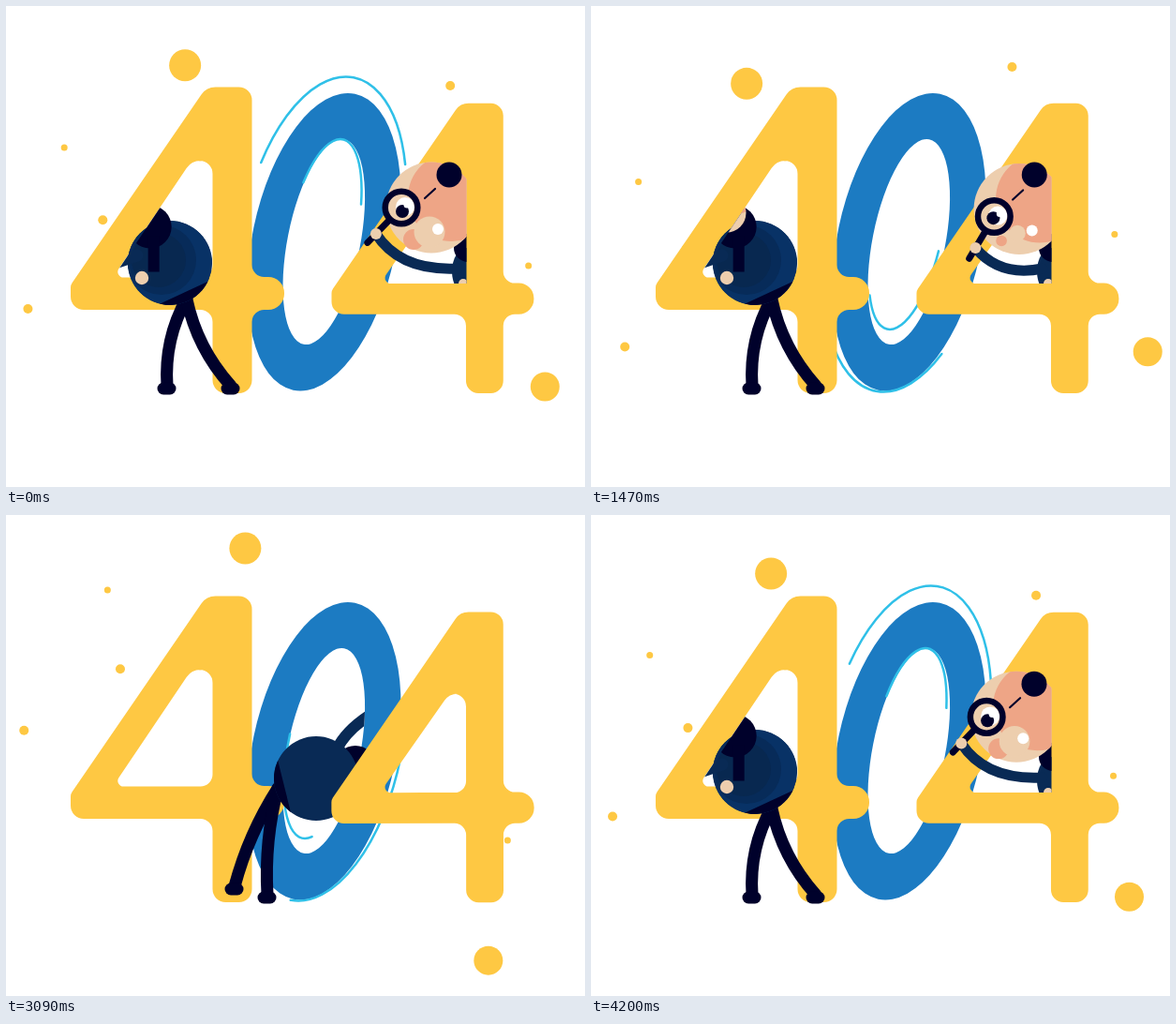
Write an HTML page with a canvas that moves like this. It is 618 by 513 pixels and loops after 4.23 s.

```html
<!DOCTYPE html>
<html lang="en">
<head>
<meta charset="utf-8">
<title>404</title>
<style>
html, body { margin: 0; width: 100%; height: 100%; overflow: hidden; background: #fff; }
canvas { display: block; }
</style>
</head>
<body>
<canvas id="stage" width="618" height="513"></canvas>
<script>
const g = document.getElementById('stage').getContext('2d');
// Time runs from the intro at START, through 0, to the hard cut at CUT
const LOOP = 4230, CUT = 2160, START = CUT - LOOP;
const TAU = Math.PI * 2, DEG = Math.PI / 180;
const YELLOW = '#fec843', BLUE = '#1c7bc2', CYAN = '#2fc0e8', INK = '#00012b';
const SUIT = '#092a55', SLEEVE = '#083266', SKIN = '#edceae', PINK = '#eea586', WHITE = '#fff';

const clamp = v => Math.max(0, Math.min(1, v));
const smooth = p => p * p * (3 - 2 * p);
const ramp = (u, from, length) => clamp((u - from) / length);
const grow = (u, from, tau) => u > from ? 1 - Math.exp((from - u) / tau) : 0;
const polar = (x, y, r, deg) => [x + r * Math.cos(deg * DEG), y + r * Math.sin(deg * DEG)];

// Blend between key poses [time, ...values]
function pose(u, keys) {
  let i = 0;
  while (i < keys.length - 2 && u >= keys[i + 1][0]) i++;
  const a = keys[i], b = keys[i + 1];
  const p = smooth(ramp(u, a[0], b[0] - a[0]));
  return a.slice(1).map((v, k) => v + (b[k + 1] - v) * p);
}

function disc(x, y, r, color) {
  g.fillStyle = color;
  g.beginPath();
  g.arc(x, y, Math.max(0, r), 0, TAU);
  g.fill();
}

function clipDisc(x, y, r, color) {
  disc(x, y, r, color);
  g.clip();
}

// Two points: line, three: quadratic, four: cubic
function stroke(pts, width, color) {
  g.strokeStyle = color;
  g.lineWidth = width;
  g.lineCap = 'round';
  g.beginPath();
  g.moveTo(pts[0], pts[1]);
  const rest = pts.slice(2);
  if (rest.length === 2) g.lineTo(...rest);
  else if (rest.length === 4) g.quadraticCurveTo(...rest);
  else g.bezierCurveTo(...rest);
  g.stroke();
}

function roundPoly(path, pts) {
  const last = pts[pts.length - 1];
  path.moveTo((last[0] + pts[0][0]) / 2, (last[1] + pts[0][1]) / 2);
  pts.forEach(([x, y, r], i) => {
    const next = pts[(i + 1) % pts.length];
    path.arcTo(x, y, next[0], next[1], r);
  });
  path.closePath();
}

// Digit 4 at a scale, placed by its lower left corner, with its own hole
function makeFour(x, s, hole) {
  const path = new Path2D();
  const outline = [
    [145, -326.5, 18], [193.5, -326.5, 14], [193.5, -124, 13], [228, -124, 17], [228, -89, 17],
    [193.5, -89, 13], [193.5, 0, 14], [151.5, 0, 14], [151.5, -89, 13], [0, -89, 14], [0, -115.5, 9]
  ];
  roundPoly(path, outline.map(([px, py, r]) => [x + px * s, 413 + py * s, r * s]));
  const [left, apex, top] = hole, right = x + 151.5 * s, base = 413 - 123.5 * s;
  roundPoly(path, [[left, base, 6], [apex, top, 18 * s], [right, top, 14 * s], [right, base, 13 * s]]);
  return path;
}
const leftFour = makeFour(69, 1, [114, 198, 165]);
const rightFour = makeFour(347.5, 0.947, [399, 473, 191]);

const zero = new Path2D(), hole = new Path2D();
hole.ellipse(339.3, 251.5, 38.8, 111.4, 11.2 * DEG, 0, TAU);
zero.ellipse(339.5, 251.7, 76.7, 161.4, 11.8 * DEG, 0, TAU);
zero.closePath();
zero.addPath(hole);

function fillPath(path, color) {
  g.fillStyle = color;
  g.fill(path, 'evenodd');
}

// Pops a digit in with overshoot, turning around its centre
function popIn(u, start, cx, cy, turn, draw) {
  const q = 1 - ramp(u, start, 645);
  if (q === 1) return;
  const s = 1 + 2 * q * q - 3 * q * q * q;
  g.save();
  g.translate(cx, cy);
  g.rotate(-turn * Math.pow(q, 1.5) * DEG);
  g.scale(s, s);
  g.translate(-cx, -cy);
  draw();
  g.restore();
}

// angle, orbit radius, size, launch time
const DOTS = [
  [166.5, 304, 5, -1902], [186.3, 217, 5, -2011], [201.5, 276, 3.5, -1856], [-124.1, 228, 17, -1921],
  [-47.1, 228, 5, -1994], [6, 240, 3.5, -1850], [31, 299, 15.5, -1980]
];

function drawDots(u) {
  const spin = 56 * (Math.pow(1 - (u - START) / 6970, 5) - 0.1717);
  for (const [angle, orbit, size, start] of DOTS) {
    const k = grow(u, start, 170);
    disc(...polar(319, 252, orbit * k, angle + spin), size * Math.min(1, k * 1.4), YELLOW);
  }
}

function sweep(from, to, x, y, rx, ry, tilt) {
  if (to <= from) return;
  g.strokeStyle = CYAN;
  g.lineWidth = 2.5;
  g.lineCap = 'round';
  g.beginPath();
  g.ellipse(x, y, rx, ry, tilt * DEG, from * DEG, to * DEG);
  g.stroke();
}

function drawZero(u) {
  fillPath(zero, BLUE);
  const tail = 328 - 0.107 * u;
  sweep(tail - 127 * grow(u, -1450, 250), tail, 337.5, 243.5, 85, 170.6, 11.5);
  const lead = 340 + 0.106 * u - 38 * Math.exp(-(u + 1140) / 437);
  sweep(lead - 130 * grow(u, -1830, 400), lead, 338, 243.5, 36.2, 103.5, 12.1);
}

// body, spine angle, feet, lift of the first foot, knee bend, hand
const CLIMB = [
  [-1140, 331, 281, 166, 244, 279, 9, 9, 392, 211],
  [-450, 185, 284, 65, 238, 256, 0, 32, 215, 321],
  [-120, 175, 274, 65, 172, 240, 0, 14, 145, 290]
];
// face, relative to the head
const FACE = [[-450, -22, -4], [0, -29, 0], [990, -13, -2], [1980, -5, -29]];

function drawLeg(hx, hy, fx, fy, bend) {
  const dx = fx - hx, dy = fy - hy, k = bend / Math.hypot(dx, dy);
  stroke([hx, hy, (hx + fx) / 2 - dy * k, (hy + fy) / 2 + dx * k, fx, fy], 13, INK);
  stroke([fx - 4, fy + 3, fx + 3, fy + 3], 13, INK);
}

function drawTorso(x, y, spine, settled) {
  g.save();
  g.beginPath();
  clipDisc(x, y, 45, SUIT);
  g.globalAlpha = settled;
  disc(x, y, 45, SLEEVE);
  disc(x - 9, y - 3, 37, '#072b59');
  disc(x - 12, y - 3, 29, '#082850');
  g.globalAlpha = 1;
  g.translate(x, y);
  g.rotate(spine * DEG);
  g.fillStyle = INK;
  g.fillRect(35, -45, 20, 90);
  g.restore();
}

function drawClimber(u) {
  if (u < -1470) return;
  const [x, y, spine, foot1, foot2, lift, bend, handX, handY] = pose(u, CLIMB);
  const hip = polar(x, y, 42, spine), [hx, hy] = polar(x, y, 44, spine + 176);
  const emerging = u < -830, settled = ramp(u, -450, 330), bow = 43 * ramp(u, -1140, 690);
  const arm = [x + 8, y - 34, x + 8 + bow, y - 36, handX + bow, handY - 10, handX, handY];

  g.save();
  if (emerging) {
    g.beginPath();
    g.rect(0, 0, 395, 513);
    g.clip();
    g.translate(175 * Math.pow(1 - ramp(u, -1470, 330), 2), 0);
    g.save();
    g.clip(hole);
    stroke([x + 22, y - 31, x + 32, y - 52, handX, handY], 12, SUIT);
    g.restore();
    disc(hx, hy, 21.5, INK);
  }
  drawLeg(...hip, foot1, 405 - lift, bend);
  drawLeg(...hip, foot2, 405, bend);
  drawTorso(x, y, spine, settled);

  if (!emerging) {
    // the head stays behind the slanted bar
    g.save();
    g.beginPath();
    g.moveTo(114, 290);
    g.lineTo(198, 165);
    g.lineTo(618, 165);
    g.lineTo(618, 340);
    g.lineTo(114, 340);
    g.clip();
    stroke([x - 35, y - 8, x - 62, y + 1], 13, SUIT);
    disc(hx, hy, 23, INK);
    const [fx, fy] = pose(u, FACE);
    clipDisc(hx + fx, hy + fy, 27 - 6 * settled, SKIN);
    disc(hx + fx + 8, hy + fy - 23, 25, PINK);
    g.restore();
    g.fillStyle = INK;
    g.fillRect(hx - 2, hy + 10, 12, 38);
    g.globalAlpha = 1 - settled;
    stroke(arm, 13, SLEEVE);
    g.globalAlpha = 1;
    disc(handX, handY, 7.2, SKIN);
  }
  g.restore();
}

// head, and how far the lens is lowered
const PEEK = [[-450, 458, 231, 0.95], [0, 454, 215, 0], [990, 448, 227, 1], [1980, 467, 205, -0.1]];

function drawHead(x, y, dip, open) {
  g.save();
  clipDisc(x, y, 48.5, SKIN);
  disc(x + 22, y - 11, 47, PINK);
  g.restore();
  const ear = 11 * clamp(1 - dip);
  disc(x - 19, y + 34, ear, PINK);
  disc(x - 2, y + 26, ear * 1.5, SKIN);
  disc(x + 19 - 6 * dip, y - 35 - 3 * dip, 13.5, INK);

  g.globalAlpha = 1 - open;
  stroke([x - 7, y - 10, x + 4, y - 20], 2.2, INK);
  g.globalAlpha = open;
  disc(x, y - 18, 8, WHITE);
  disc(x - 7, y - 12, 7, INK);
  g.globalAlpha = 1;
  const mx = x + 7 + 14 * dip, my = y + 23 - 8 * open;
  stroke([mx - 2 * open, my + 8 * open, mx + 3 * open, my - 7 * open + 0.01], 12, WHITE);
}

function drawLens(x, y, dip, angle) {
  stroke([...polar(x, y, 19, angle), ...polar(x, y, 52, angle)], 7, INK);
  disc(x, y, 17, SKIN);
  disc(x + 4, y - 1, 10, WHITE);
  disc(x + 1 - 4 * dip, y + 4 - 5 * dip, 7, INK);
  disc(x + 6, y - 3, 3.5, WHITE);
  g.strokeStyle = INK;
  g.lineWidth = 6.5;
  g.beginPath();
  g.arc(x, y, 17.3, 0, TAU);
  g.stroke();
}

function drawPeeker(u) {
  if (u < -930) return;
  const [x, y, dip] = pose(u, PEEK);
  const lx = x - 32 + 11 * dip, ly = y + 17 * dip, angle = 134 - 28 * dip;
  const [hx, hy] = polar(lx, ly, 39, angle);
  g.save();
  g.beginPath();
  g.rect(0, 0, 491.5, 296);
  g.clip();
  g.translate(110 * Math.pow(1 - ramp(u, -930, 330), 3), 0);

  g.fillStyle = SUIT;
  g.beginPath();
  g.ellipse(492, 283, 16, 25, 0, 0, TAU);
  g.fill();
  disc(493, 258, 15, INK);
  stroke([hx, hy, hx + 26, hy * 0.42 + 181, 482, 280], 11, SUIT);
  drawHead(x, y, dip, 1 - ramp(u, -300, 100));
  drawLens(lx, ly, dip, angle);
  disc(hx, hy, 6, SKIN);
  disc(488, 296, 5, SKIN);
  g.restore();
}

function frame(ms) {
  const t = ms % LOOP, u = t < CUT ? t : t - LOOP;
  g.fillStyle = WHITE;
  g.fillRect(0, 0, 618, 513);
  drawDots(u);
  popIn(u, -1823, 339.5, 251.7, 5.1, () => drawZero(u));
  popIn(u, -2040, 182, 250, 21.7, () => fillPath(leftFour, YELLOW));
  drawClimber(u);
  popIn(u, -1765, 454, 258, 11, () => fillPath(rightFour, YELLOW));
  drawPeeker(u);
}

const begin = performance.now();
function tick() {
  frame(performance.now() - begin);
  requestAnimationFrame(tick);
}
tick();
</script>
</body>
</html>
```
